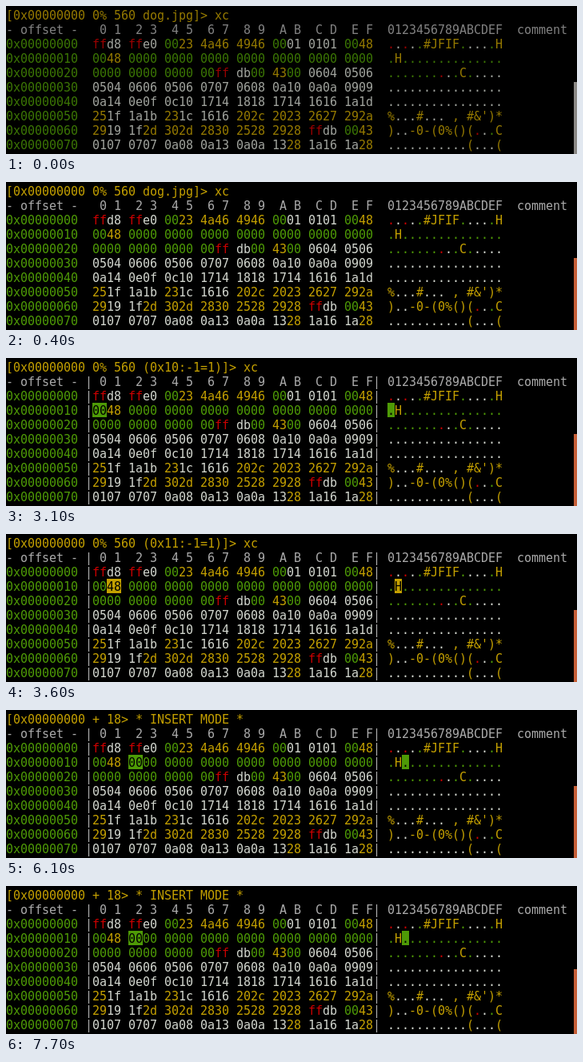
Recreate the animation shown at these times as an HTML page. Size 714 by 185 pixels, loop 8000 ms.

```html
<!DOCTYPE html>
<html lang="en">
<head>
<meta charset="utf-8">
<title>Hex editor</title>
<style>
  html, body { margin: 0; width: 100%; height: 100%; overflow: hidden; background: #000; }
  #stage { position: relative; width: 714px; height: 185px; overflow: hidden; background: #000; }
  #text {
    position: absolute; left: 0; top: 3px; margin: 0;
    font: 15px/18px "DejaVu Sans Mono", monospace;
    letter-spacing: calc(9px - 1ch); font-variant-ligatures: none;
    color: #aaa;
  }
  .box { position: absolute; height: 18px; }
  #bar { position: absolute; left: 710px; width: 4px; bottom: 0; }
</style>
</head>
<body>
<div id="stage">
  <div class="box" id="hexBox"></div>
  <div class="box" id="charBox"></div>
  <pre id="text"></pre>
  <div id="bar"></div>
</div>
<script>
const CELL = 9, LINE = 18, TOP = 2, HEX_COL = 12, CHAR_COL = 53, LOOP = 8000;
const RED = '#cc0000', GREEN = '#4e9a06', YELLOW = '#c4a000', WHITE = '#d3d7cf';
const GRAY_BAR = '#8b8986', ORANGE_BAR = '#c65f38';

const rows = [
  'ffd8ffe000234a464946000101010048',
  '00480000000000000000000000000000',
  '00000000000000ffdb00430006040506',
  '050406060506070706080a100a0a0909',
  '0a140e0f0c1017141818171416161a1d',
  '251f1a1b231c1616202c20232627292a',
  '29191f2d302d283025282928ffdb0043',
  '010707070a080a130a0a13281a161a28'
].map(row => row.match(/../g));

const view = info => `[0x00000000 0% 560 ${info}]> xc`;
const steps = [
  { at: 0, title: view('dog.jpg'), focused: false },
  { at: 400, title: view('dog.jpg') },
  { at: 1700, title: view('(0x0:-1=1)'), cursor: 0 },
  { at: 3100, title: view('(0x10:-1=1)'), cursor: 16 },
  { at: 3600, title: view('(0x11:-1=1)'), cursor: 17 },
  { at: 4000, title: view('(0x12:-1=1)'), cursor: 18 },
  { at: 6100, title: '[0x00000000 + 18> * INSERT MODE *', cursor: 18 },
  { at: 7700, title: '[0x00000000 + 18> * INSERT MODE *', cursor: 18, barTop: 104 }
];

const $ = id => document.getElementById(id);
const printable = n => n >= 32 && n < 127;

function byteColor(n) {
  if (n === 255) return RED;
  if (n === 0) return GREEN;
  return printable(n) ? YELLOW : WHITE;
}

function paint(text, color) {
  const safe = text.replace(/&/g, '&amp;').replace(/</g, '&lt;').replace(/>/g, '&gt;');
  return `<span style="color:${color}">${safe}</span>`;
}

function hexRow(bytes, r, cursor, edge) {
  let hex = '', chars = '';
  bytes.forEach((byte, i) => {
    const n = parseInt(byte, 16);
    const color = r * 16 + i === cursor ? '#000' : byteColor(n);
    hex += paint(byte, color) + (i % 2 && i < 15 ? ' ' : '');
    chars += paint(printable(n) ? String.fromCharCode(n) : '.', color);
  });
  const offset = '0x' + (r * 16).toString(16).padStart(8, '0');
  return `${paint(offset, GREEN)} ${edge}${hex}${edge} ${chars}`;
}

function placeBox(id, col, row, cells, color) {
  Object.assign($(id).style, {
    left: col * CELL + 'px', top: TOP + row * LINE + 'px',
    width: cells * CELL + 'px', background: color
  });
}

function render({ title, cursor = -1, focused = true, barTop = 95 }) {
  const active = cursor >= 0;
  const edge = active ? '|' : ' ';
  const digits = '0123456789ABCDEF';
  const pairs = digits.match(/../g).map(p => ` ${p[0]} ${p[1]}`).join(' ');
  $('text').innerHTML = [
    paint(title, YELLOW),
    `- offset - ${edge}${pairs}${edge} ${digits}  comment`,
    ...rows.map((bytes, r) => hexRow(bytes, r, cursor, edge))
  ].join('\n');
  $('text').style.opacity = focused ? 1 : 0.76;

  $('hexBox').hidden = $('charBox').hidden = !active;
  if (active) {
    const r = cursor >> 4, i = cursor & 15;
    const color = byteColor(parseInt(rows[r][i], 16));
    placeBox('hexBox', HEX_COL + i * 2 + (i >> 1), r + 2, 2, color);
    placeBox('charBox', CHAR_COL + i, r + 2, 1, color);
  }
  $('bar').style.background = focused ? ORANGE_BAR : GRAY_BAR;
  $('bar').style.top = barTop + 'px';
}

let shown;
function tick() {
  const t = performance.now() % LOOP;
  const step = steps.findLast(s => s.at <= t);
  if (step !== shown) render(shown = step);
  requestAnimationFrame(tick);
}
tick();
</script>
</body>
</html>
```
